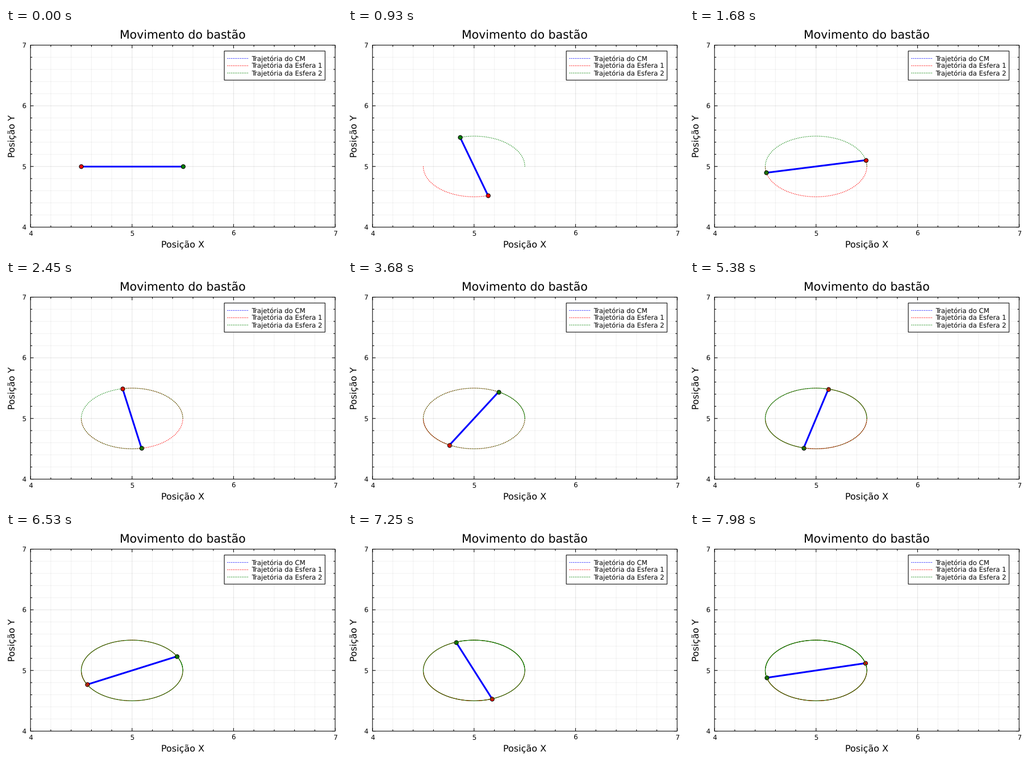
A matplotlib script for the animation above (8000 ms loop, 600 by 400 pixels).

```python
import numpy as np
import matplotlib.pyplot as plt
from matplotlib.animation import FuncAnimation
from matplotlib.patches import Rectangle

W, H, DPI = 600, 400, 100
PX = 72 / DPI                      # one pixel in points
THIN = 1.07                        # base line width, px
FRAMES, INTERVAL = 320, 25
STEP = 0.05                        # rotation per frame, rad
LEFT, BOTTOM = 43.77, 355.6
UX, UY = 544 / 3, 325 / 3          # pixels per data unit
SMALL, MEDIUM, LARGE = 11.84, 16.28, 20.72

plt.rcParams.update({
    "font.family": "DejaVu Sans",
    "text.hinting": "none",
    "path.simplify": False,
})

fig = plt.figure(figsize=(W / DPI, H / DPI), dpi=DPI, facecolor="white")
ax = fig.add_axes([0, 0, 1, 1])
ax.set(xlim=(0, W), ylim=(H, 0))
ax.axis("off")


def to_px(x, y):
    return LEFT + (x - 4) * UX, BOTTOM - (y - 4) * UY


def label(x, y, s, size, ha="center", **kw):
    ax.text(x, y, s, fontsize=size * PX, ha=ha, va="baseline", zorder=6, **kw)


def stroke(xs, ys, **kw):
    ax.plot(xs, ys, color="black", lw=THIN * PX, snap=False,
            solid_capstyle="butt", **kw)


def box(x0, y0, x1, y1, **kw):
    ax.add_patch(Rectangle((x0, y0), x1 - x0, y1 - y0, ec="black",
                           lw=THIN * PX, snap=False, **kw))


def dotted(color, xs=(), ys=(), **kw):
    dashes = (1.5 / THIN, 1.7 / THIN)
    return ax.plot(xs, ys, color=color, lw=THIN * PX, ls=(0, dashes),
                   dash_capstyle="butt", snap=False, **kw)[0]


def draw_axes():
    x0, y0 = to_px(4, 4)
    x1, y1 = to_px(7, 7)
    for i in range(16):
        major = i % 5 == 0
        x, y = to_px(4 + i / 5, 4 + i / 5)
        if 0 < i < 15:
            shade = dict(alpha=0.1 if major else 0.05, zorder=1)
            stroke([x, x], [y0, y1], **shade)
            stroke([x0, x1], [y, y], **shade)
        n = 5.5 if major else 3
        for a, b in ((y0, y0 - n), (y1, y1 + n)):
            stroke([x, x], [a, b], zorder=2)
        for a, b in ((x0, x0 + n), (x1, x1 - n)):
            stroke([a, b], [y, y], zorder=2)
        if major:
            value = str(4 + i // 5)
            label(x, 371.3, value, SMALL)
            label(36, y + 4.4, value, SMALL, ha="right")
    box(x0, y0, x1, y1, fill=False, zorder=2)
    label(315.4, 18.8, "Movimento do bastão", LARGE)
    label(315.6, 392.3, "Posição X", MEDIUM)
    label(16.4, 193, "Posição Y", MEDIUM, rotation=90,
          rotation_mode="anchor")


def draw_legend():
    box(389.8, 41.1, 569.8, 93.1, fc="white", zorder=5)
    rows = (("blue", "Trajetória do CM"),
            ("red", "Trajetória da Esfera 1"),
            ("green", "Trajetória da Esfera 2"))
    for i, (color, name) in enumerate(rows):
        y = 54.4 + 13 * i
        dotted(color, [395.5, 433], [y, y], zorder=6)
        label(438.5, y + 4.6, name, SMALL, ha="left")


def ball(color):
    return ax.plot([], [], "o", color=color, ms=7.2 * PX, mec="black",
                   mew=THIN * PX, zorder=4, snap=False)[0]


draw_axes()
draw_legend()
bar = ax.plot([], [], color="blue", lw=3.1 * PX, solid_capstyle="butt",
              zorder=3)[0]
balls = [ball("red"), ball("green")]
trails = [dotted(c, zorder=4.5) for c in ("red", "green")]


def update(k):
    angle = STEP * np.arange(k + 1)
    ends = []
    for phase, dot, trail in zip((np.pi, 0), balls, trails):
        x, y = to_px(5 + 0.5 * np.cos(angle + phase),
                     5 + 0.5 * np.sin(angle + phase))
        trail.set_data(x, y)
        dot.set_data(x[-1:], y[-1:])
        ends.append((x[-1], y[-1]))
    bar.set_data(*zip(*ends))
    return [bar, *balls, *trails]


anim = FuncAnimation(fig, update, frames=FRAMES, interval=INTERVAL,
                     init_func=lambda: update(0), repeat=True, repeat_delay=0)
plt.show()
```
